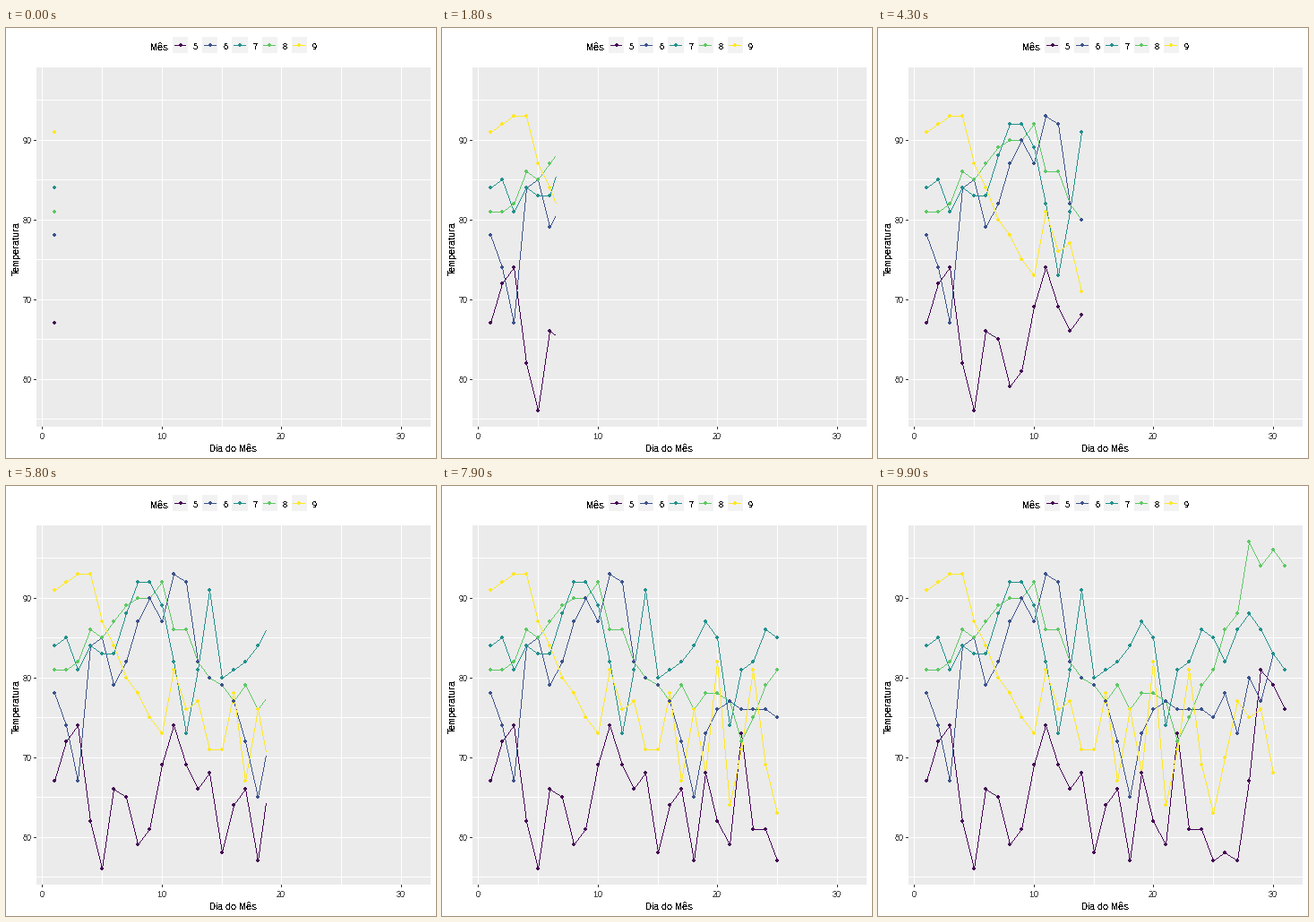
These frames come from a looping animation (480 px wide and 480 px high, 10000 ms). A matplotlib script:

```python
import matplotlib as mpl
import matplotlib.pyplot as plt
import numpy as np
from matplotlib.animation import FuncAnimation

mpl.rcParams.update({
    "font.family": "Liberation Sans",
    "text.antialiased": False,
    "text.hinting": "native",
    "text.hinting_factor": 1,
})

SIZE, DPI, FRAMES = 480, 100, 100
LAST_DAY = 31

# Daily temperatures, one series per month
may = [67, 72, 74, 62, 56, 66, 65, 59, 61, 69, 74, 69, 66, 68, 58, 64,
       66, 57, 68, 62, 59, 73, 61, 61, 57, 58, 57, 67, 81, 79, 76]
june = [78, 74, 67, 84, 85, 79, 82, 87, 90, 87, 93, 92, 82, 80, 79,
        77, 72, 65, 73, 76, 77, 76, 76, 76, 75, 78, 73, 80, 77, 83]
july = [84, 85, 81, 84, 83, 83, 88, 92, 92, 89, 82, 73, 81, 91, 80, 81,
        82, 84, 87, 85, 74, 81, 82, 86, 85, 82, 86, 88, 86, 83, 81]
august = [81, 81, 82, 86, 85, 87, 89, 90, 90, 92, 86, 86, 82, 80, 79, 77,
          79, 76, 78, 78, 77, 72, 75, 79, 81, 86, 88, 97, 94, 96, 94]
september = [91, 92, 93, 93, 87, 84, 80, 78, 75, 73, 81, 76, 77, 71, 71,
             78, 67, 76, 68, 82, 64, 71, 81, 69, 63, 70, 77, 75, 76, 68]
months = (may, june, july, august, september)


def rgb(code):
    return [int(code[i:i + 2], 16) for i in (1, 3, 5)]


COLORS = [rgb(c) for c in
          ("#440154", "#3B528B", "#21908C", "#5DC863", "#FDE725")]
PANEL, KEY, TICK, WHITE = map(rgb, ("#EBEBEB", "#F2F2F2", "#333333", "#FFFFFF"))
LEFT, RIGHT, TOP, BOTTOM = 34, 474, 44, 445
KEY_X, KEY_STEP = 186.4, 33.2


def px(day):
    return int(40.8 + 13.35 * day)


def py(temp):
    return int(44.5 + 8.9 * (99.05 - temp))


def rect(img, x0, y0, x1, y1, color):
    img[y0:y1, x0:x1] = color


def line(img, x0, y0, x1, y1, color):
    """One pixel wide, end pixel left open."""
    n = max(abs(x1 - x0), abs(y1 - y0))
    if n:
        t = np.arange(n) / n
        xs = np.floor(x0 + (x1 - x0) * t + 0.5).astype(int)
        ys = np.floor(y0 + (y1 - y0) * t + 0.5).astype(int)
        img[ys, xs] = color


def dot(img, x, y, color):
    rect(img, x - 1, y - 2, x + 1, y + 2, color)
    rect(img, x - 2, y - 1, x + 2, y + 1, color)


def backdrop():
    img = np.full((SIZE, SIZE, 3), 255, np.uint8)
    rect(img, LEFT, TOP, RIGHT, BOTTOM, PANEL)
    for day in range(0, 31, 5):
        x = px(day)
        rect(img, x, TOP, x + 1, BOTTOM, WHITE)
        if day % 10 == 0:
            rect(img, x, BOTTOM, x + 1, BOTTOM + 3, TICK)
    for temp in range(55, 100, 5):
        y = py(temp)
        rect(img, LEFT, y, RIGHT, y + 1, WHITE)
        if temp % 10 == 0:
            rect(img, LEFT - 3, y, LEFT, y + 1, TICK)
    for i, color in enumerate(COLORS):
        x = KEY_X + KEY_STEP * i
        rect(img, int(x), 10, int(x + 17.28), 28, KEY)
        line(img, int(x + 1.73), 19, int(x + 15.55), 19, color)
        dot(img, int(x + 8.64), 19, color)
    return img


# Each day snaps to a whole step; the head moves evenly between them
days = np.arange(1, LAST_DAY + 1)
steps = [round(3.3 * (d - 1)) for d in range(1, LAST_DAY + 1)]

# Dots stack by row label, sorted as text
dots = []
row = 0
for temps, color in zip(months, COLORS):
    for day, temp in enumerate(temps, 1):
        row += 1
        dots.append((str(row), steps[day - 1], px(day), py(temp), color))
dots.sort(key=lambda d: d[0])

base = backdrop()


def render(i):
    img = base.copy()
    now = np.interp(i, steps, days)
    for temps, color in zip(months, COLORS):
        head = min(now, len(temps))
        xs = [*range(1, int(head) + 1), head]
        pts = [(px(d), py(np.interp(d, days[:len(temps)], temps))) for d in xs]
        for a, b in zip(pts, pts[1:]):
            line(img, *a, *b, color)
    for _, step, x, y, color in dots:
        if step <= i:
            dot(img, x, y, color)
    return img


fig = plt.figure(figsize=(SIZE / DPI, SIZE / DPI), dpi=DPI, facecolor="white")
ax = fig.add_axes([0, 0, 1, 1])
ax.axis("off")
view = ax.imshow(base, extent=(0, SIZE, SIZE, 0), interpolation="nearest",
                 aspect="auto")


def label(x, y, s, size, color="black", ha="center", **kw):
    ax.text(x, y, s, fontsize=size * 72 / DPI, color=color, ha=ha,
            va="baseline", **kw)


for day in range(0, 31, 10):
    label(px(day), 459, str(day), 9, "#4D4D4D")
for temp in range(60, 91, 10):
    label(29, py(temp) + 4, str(temp), 9, "#4D4D4D", ha="right")
label(253.5, 473, "Dia do Mês", 11)
label(15, 245.5, "Temperatura", 11, rotation=90, rotation_mode="anchor")
label(161, 25, "Mês", 11, ha="left")
for i in range(5):
    label(211.5 + KEY_STEP * i, 24, str(i + 5), 9)


def update(i):
    view.set_data(render(i))
    return [view]


anim = FuncAnimation(fig, update, frames=FRAMES, interval=100, repeat=True,
                     repeat_delay=0, blit=False)
plt.show()
```
